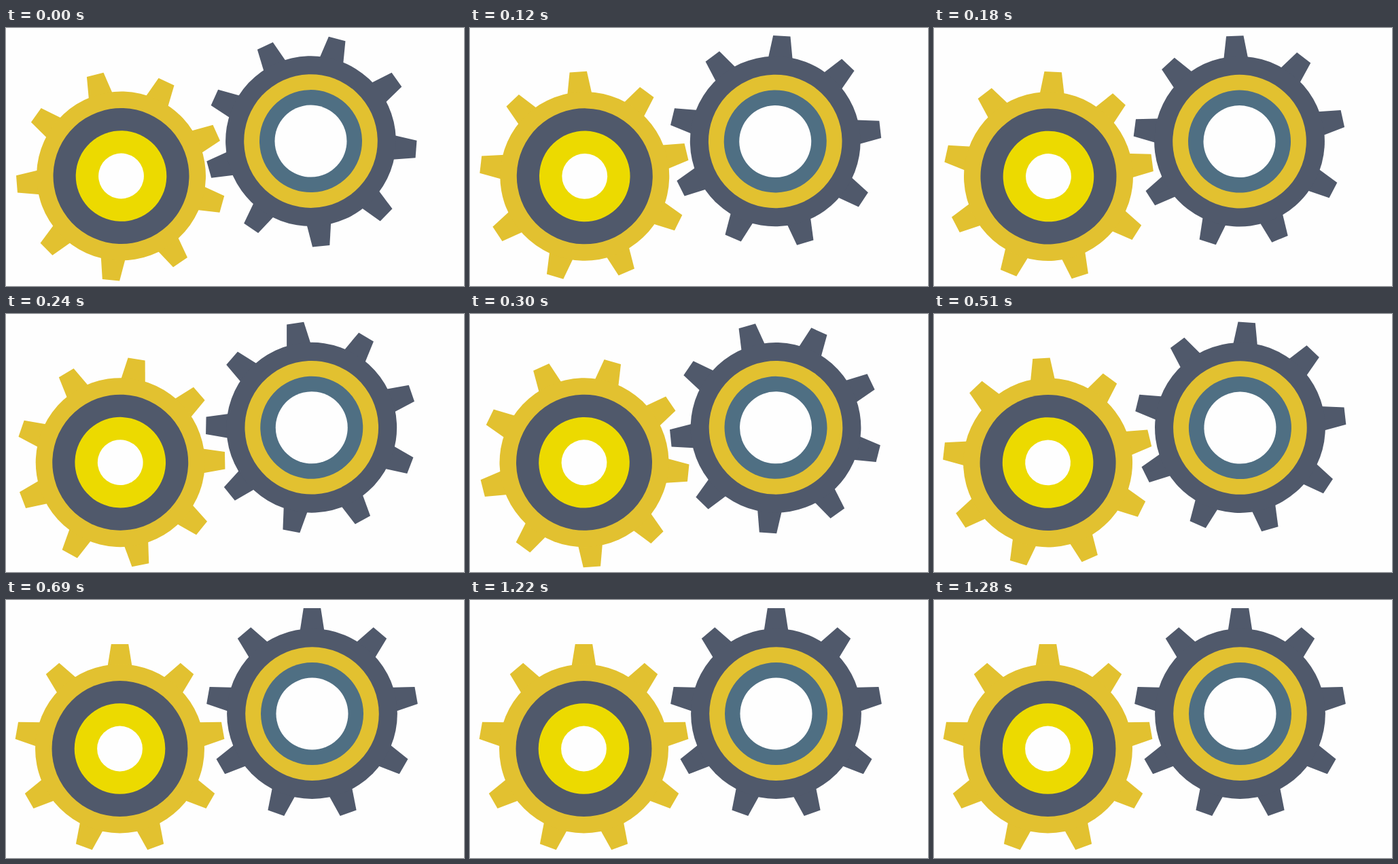
These frames come from a looping animation (674x380 px, 1600 ms). An HTML page:

```html
<!DOCTYPE html>
<html lang="en">
<head>
<meta charset="utf-8">
<title>Gears</title>
<style>
  html, body { margin: 0; width: 100%; height: 100%; overflow: hidden; background: #fefefe; }
  svg { display: block; width: 674px; height: 380px; }
</style>
</head>
<body>
<svg id="stage" viewBox="0 0 674 380"></svg>
<script>
const LOOP = 1600;
const TEETH = 9;
const GOLD = '#e2c130', SLATE = '#50596b', LEMON = '#ecda00', TEAL = '#4f6f83', WHITE = '#fefefe';

// The motion advances in held steps that start at these times (ms).
const starts = [0, 60, 120, 180, 240, 300, 390, 450, 510, 600, 690];
const LAST = starts.length - 1;

const stage = document.getElementById('stage');

function add(parent, tag, attrs) {
  const el = document.createElementNS('http://www.w3.org/2000/svg', tag);
  for (const key in attrs) el.setAttribute(key, attrs[key]);
  return parent.appendChild(el);
}

// rings: [radius, fill] from the body inwards
function makeGear({ x, y, dir, tip, rings }) {
  const g = add(stage, 'g', {});
  const fill = rings[0][1];
  for (let i = 0; i < TEETH; i++) {
    add(g, 'path', {
      d: `M-12.7 ${-tip}H12.7L19 -115H-19Z`,
      fill,
      transform: `rotate(${i * 360 / TEETH})`
    });
  }
  for (const [r, color] of rings) add(g, 'circle', { r, fill: color });
  return { g, x, y, dir };
}

const gears = [
  makeGear({
    x: 167.5, y: 219, dir: 1, tip: 154,
    rings: [[124.5, GOLD], [100, SLATE], [66.8, LEMON], [33.4, WHITE]]
  }),
  makeGear({
    x: 450.5, y: 167.6, dir: -1, tip: 155.5,
    rings: [[125.4, SLATE], [98.3, GOLD], [75.5, TEAL], [53, WHITE]]
  })
];

// Speeds up gently, then brakes into the rest pose.
function turn(step) {
  if (step <= 7) return -54.4 + 5.03 * step + 0.2 * step * step;
  return -9.4 * ((LAST - step) / 3) ** 2.37;
}

function draw(t) {
  const step = starts.filter(s => s <= t).length - 1;
  const angle = turn(step);
  const drift = (1 - step / LAST) ** 2;
  for (const { g, x, y, dir } of gears) {
    const cx = x + 2 * dir * drift, cy = y - drift;
    g.setAttribute('transform', `translate(${cx} ${cy}) rotate(${dir * angle})`);
  }
}

const begin = performance.now();
function tick() {
  draw((performance.now() - begin) % LOOP);
  requestAnimationFrame(tick);
}
tick();
</script>
</body>
</html>
```
